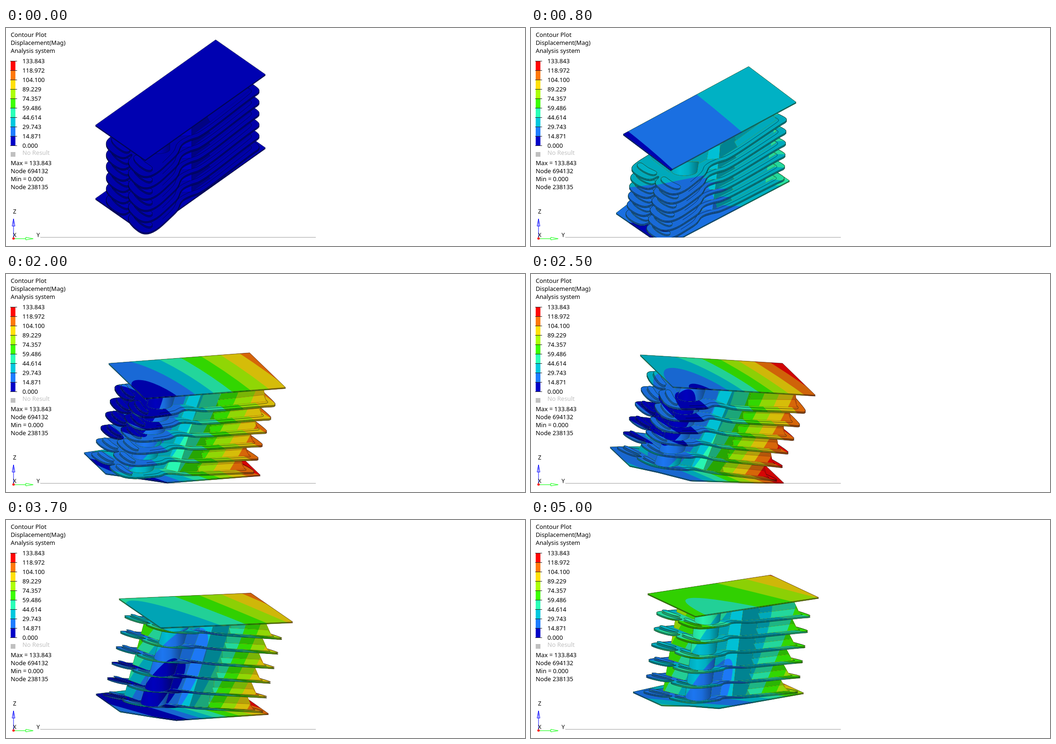
Animation of 1104x464 px, one loop 5100 ms. Source, as an HTML page with a canvas:

```html
<!DOCTYPE html>
<html lang="en">
<head>
<meta charset="utf-8">
<title>Contour Plot</title>
<style>
  html, body { margin: 0; width: 100%; height: 100%; overflow: hidden; background: #fff; }
  svg, canvas { position: absolute; left: 0; top: 0; width: 1104px; height: 464px; }
  text { font: 12.8px "Noto Sans", "Open Sans", sans-serif; fill: #000; }
  .axis { font-size: 12px; }
  .off { fill: #c0c0c0; }
</style>
</head>
<body>
<svg viewBox="0 0 1104 464">
  <path d="M73 445.5H659" stroke="#a0a0a0"/>
</svg>
<canvas id="stage" width="1104" height="464"></canvas>
<svg viewBox="0 0 1104 464">
  <text x="10" y="18.5">Contour Plot</text>
  <text x="10" y="35.5">Displacement(Mag)</text>
  <text x="10" y="52.5">Analysis system</text>
  <g id="legend"></g>
  <rect x="10" y="264" width="10" height="10" fill="#c0c0c0"/>
  <text class="off" x="35" y="269.5">No Result</text>
  <text x="10" y="291.5">Max = 133.843</text>
  <text x="10" y="308.5">Node 694132</text>
  <text x="10" y="325.5">Min = 0.000</text>
  <text x="10" y="342.5">Node 238135</text>
  <g fill="none">
    <path d="M16 447V407M13 421.5L16 406L19 421.5Z" stroke="#00f"/>
    <path d="M17 448.5H42M42 445.5L58 448.5L42 451Z" stroke="#0f0"/>
  </g>
  <circle cx="16" cy="448" r="2.5" fill="#f00"/>
  <text class="axis" x="15" y="395">Z</text>
  <text class="axis" x="15" y="445">X</text>
  <text class="axis" x="65" y="445">Y</text>
</svg>
<script>
const BANDS = ['#0000c8', '#1e7dff', '#00c8de', '#2affb8', '#3cff00', '#acff05', '#ffe00a', '#ff780a', '#ff0505'];
const LOOP = 5100, TICK = 100;
const STEP = 14.871 / 0.69;             // pixels of travel per colour band
const TIMES = [0, 800, 1600, 2500, 3100, 4200, 5000];

// left, front and right corner, then extra travel at the same corners
const LID = [
  [190, 207, 296, 281, 552, 99, 0, 0, 0, 0, 0, 0],
  [196, 226, 297, 302, 564, 158, 0, 0, 0, 0, 0, 0],
  [207, 206, 292, 284, 585, 220, 5, 0, 0, 0, 0, 0],
  [232, 172, 302, 240, 605, 258, 10, -4, 0, 0, 0, 0],
  [232, 171, 313, 237, 606, 240, 10, -4, 0, 0, 0, 0],
  [247, 164, 342, 221, 613, 197, 16, 32, 19, 23, 29, -3],
  [248, 157, 350, 205, 612, 165, 29, 20, 22, 26, 30, 29]
];
// middle-left, right tip and back-left of the top tray, then of the bottom tray
const TRAYS = [
  [257, 281, 538, 135, 211, 243, 257, 401, 538, 255, 211, 363],
  [261, 326, 543, 196, 212, 297, 243, 422, 538, 321, 200, 392],
  [253, 292, 561, 258, 219, 263, 219, 420, 532, 398, 183, 390],
  [272, 246, 582, 293, 247, 208, 223, 388, 522, 438, 182, 367],
  [288, 232, 585, 273, 249, 203, 229, 385, 535, 425, 190, 370],
  [300, 212, 587, 233, 253, 203, 262, 378, 554, 391, 218, 366],
  [310, 213, 593, 204, 265, 196, 290, 376, 567, 365, 237, 364]
];
// bent bottom plate, left to right along its near edge
const BASE = [
  [190, 363, 243, 400, 296, 437, 310, 427, 552, 255],
  [181, 394, 255, 445, 322, 445, 335, 438, 550, 325],
  [167, 390, 220, 438, 300, 445, 345, 445, 545, 404],
  [168, 368, 210, 408, 270, 421, 340, 439, 538, 445],
  [177, 371, 222, 410, 285, 425, 345, 435, 547, 432],
  [203, 369, 260, 403, 325, 409, 378, 416, 568, 395],
  [217, 366, 278, 394, 337, 395, 400, 400, 580, 368]
];
// tray outline: s along the tray, v across it
const FLANGE = [
  [0.96, 2], [1.02, 0.2], [1.005, -0.05], [0.94, 0], [0.48, 0], [0.42, 0.16], [0.34, 0.24],
  [0.28, 0.04], [0.2, 0], [0.06, -0.06], [-0.02, 0.1], [-0.03, 0.55], [-0.01, 0.95],
  [0.05, 1], [0.06, 1.08], [-0.01, 1.1], [-0.03, 1.55], [-0.01, 2], [0.08, 2.05], [0.2, 2]
];
const RIM = [[0.96, 0.6], [0.98, 0.16], [0.93, 0.13], [0.5, 0.13], [0.43, 0.3], [0.33, 0.38], [0.28, 0.2], [0.2, 0.14], [0.1, 0.1]];

const ctx = document.getElementById('stage').getContext('2d');
let trays;

function sample(keys, t) {
  let i = 0;
  while (i < TIMES.length - 2 && t > TIMES[i + 1]) i++;
  const h = TIMES[i + 1] - TIMES[i], x = (t - TIMES[i]) / h;
  const slope = (j, n) => {
    const a = Math.max(j - 1, 0), b = Math.min(j + 1, TIMES.length - 1);
    return (keys[b][n] - keys[a][n]) / (TIMES[b] - TIMES[a]) * h;
  };
  return keys[i].map((p, n) => {
    const q = keys[i + 1][n], m = slope(i, n), k = slope(i + 1, n);
    return p + x * (m + x * (3 * (q - p) - 2 * m - k + x * (2 * (p - q) + m + k)));
  });
}

const pair = (row, i) => [row[2 * i], row[2 * i + 1]];
const sub = (a, b) => [a[0] - b[0], a[1] - b[1]];
const add = (a, b, f = 1) => [a[0] + b[0] * f, a[1] + b[1] * f];

function spot(row, k, s, v) {
  const at = i => add(pair(row, i), sub(pair(row, i + 3), pair(row, i)), k / 5);
  const f = at(0);
  return add(add(f, sub(at(1), f), s), sub(at(2), f), v - 1 + s);
}
const pt = (k, s, v) => spot(trays, k, s, v);
const ref = (k, s, v) => {
  const p = pt(k, s, v);
  return [p, sub(p, spot(TRAYS[0], k, s, v))];
};

function poly(points, closed = true) {
  const path = new Path2D();
  points.forEach(p => path.lineTo(...p));
  if (closed) path.closePath();
  return path;
}

function smooth(points, closed = true) {
  const path = new Path2D(), n = points.length;
  const mid = i => {
    const a = points[i % n], b = points[(i + 1) % n];
    return [(a[0] + b[0]) / 2, (a[1] + b[1]) / 2];
  };
  path.moveTo(...mid(0));
  for (let i = 1; i < (closed ? n + 1 : n - 1); i++) path.quadraticCurveTo(...points[i % n], ...mid(i));
  return path;
}

// Travel is linear over a flat part, so each contour is an ellipse.
function paint(path, refs, shade) {
  const [[p0, d0], [p1, d1], [p2, d2]] = refs;
  const u = sub(d1, d0), w = sub(d2, d0), p = sub(p1, p0), q = sub(p2, p0);
  const det = u[0] * w[1] - u[1] * w[0];
  ctx.save();
  ctx.clip(path);
  if (Math.abs(det) < 0.02) {
    ctx.fillStyle = BANDS[Math.min(8, Math.floor(Math.hypot(...d0) / STEP))];
    ctx.fillRect(0, 0, 1104, 464);
  } else {
    const a = (p[0] * w[1] - q[0] * u[1]) / det, b = (p[1] * w[1] - q[1] * u[1]) / det;
    const c = (q[0] * u[0] - p[0] * w[0]) / det, d = (q[1] * u[0] - p[1] * w[0]) / det;
    ctx.fillStyle = BANDS[8];
    ctx.fillRect(0, 0, 1104, 464);
    ctx.save();
    ctx.transform(a, b, c, d, p0[0] - a * d0[0] - c * d0[1], p0[1] - b * d0[0] - d * d0[1]);
    for (let i = 8; i > 0; i--) {
      ctx.fillStyle = BANDS[i - 1];
      ctx.beginPath();
      ctx.arc(0, 0, i * STEP, 0, 7);
      ctx.fill();
    }
    ctx.restore();
  }
  ctx.fillStyle = typeof shade === 'number' ? `rgba(5,10,10,${1 - shade})` : shade;
  ctx.fillRect(0, 0, 1104, 464);
  ctx.restore();
}

function line(path, alpha = 0.7, width = 1) {
  ctx.strokeStyle = `rgba(0,10,20,${alpha})`;
  ctx.lineWidth = width;
  ctx.stroke(path);
}

function wall(k, low, high, shade, top = 1) {
  const s = (low[0][0] + low[low.length - 1][0]) / 2;
  const path = poly([...low.map(c => pt(k, ...c)), ...high.map(c => pt(k - top, ...c)).reverse()]);
  paint(path, [ref(k, 0, 0.4), ref(k, 1, 0.4), ref(k - 1, s, 0.4)], shade);
  line(path, 0.18);
}

function pillar(k) {
  const a = pt(k, 0.2, 0.62), b = pt(k - 1, 0.2, 0.62), r = 27;
  const path = new Path2D();
  path.ellipse(...a, r, 9, 0, Math.PI, 0, true);
  path.lineTo(b[0] + r, b[1]);
  path.lineTo(b[0] - r, b[1]);
  path.closePath();
  const g = ctx.createLinearGradient(a[0] - r, 0, a[0] + r, 0);
  [0.16, 0.06, 0.14, 0.4].forEach((o, i) => g.addColorStop(i / 3, `rgba(5,10,10,${o})`));
  paint(path, [ref(k, 0, 0.6), ref(k, 1, 0.6), ref(k - 1, 0.2, 0.6)], g);
  line(path, 0.35);
}

function petal(k, v, refs) {
  const strip = up => smooth([[0.03, v], [0.015, v + 0.4], [0.03, v + 0.78], [0.075, v + 0.78], [0.06, v + 0.4], [0.075, v]]
    .map(c => pt(k - up, ...c)));
  const foot = strip(0), cap = strip(0.14);
  paint(foot, refs, 0.6);
  line(foot, 0.5);
  paint(cap, refs, 0.88);
  line(cap, 0.65);
}

function tray(k) {
  const flat = [ref(k, 0, 1), ref(k, 1, 0), ref(k, 0, 2)];
  const pts = FLANGE.map(c => pt(k, ...c));
  const under = smooth(pts.map(p => add(p, [0, 3]))), top = smooth(pts);
  paint(under, flat, 0.62);
  line(under, 0.75);
  paint(top, flat, 0.84);
  line(top, 0.75);
  line(smooth(RIM.map(c => pt(k, ...c)), false), 0.6);
  petal(k, 1.15, flat);
  petal(k, 0.12, flat);

  wall(k, [[0.15, 1.8], [0.13, 0.95], [0.3, 0.6]], [[0.15, 1.8], [0.13, 0.95], [0.3, 0.6]], 0.8);
  wall(k, [[0.26, 0.6], [0.4, 0.5]], [[0.26, 0.6], [0.4, 0.5]], 0.78);
  pillar(k);
  wall(k, [[0.38, 0.5], [0.44, 0.25]], [[0.4, 0.55], [0.46, 0.35]], 0.96);
  wall(k, [[0.44, 0.25], [0.6, 0.22]], [[0.46, 0.35], [0.6, 0.4]], 0.64);
  wall(k, [[0.6, 0.22], [0.965, 0.28]], [[0.6, 0.4], [0.94, 0.7]], 0.7);
  wall(k, [[0.6, 0.22], [0.965, 0.24]], [[0.6, 0.36], [0.95, 0.42]], 0.84, 0.3);
}

function plate(points, refs, shade) {
  const side = poly(points.map(p => add(p, [0, 2]))), top = poly(points);
  paint(side, refs, 0.5);
  line(side, 0.45);
  paint(top, refs, shade);
  line(top, 0.5);
}

function draw(t) {
  const lid = sample(LID, t), base = sample(BASE, t);
  trays = sample(TRAYS, t);
  const shade = 0.88 - 0.07 * Math.min(1, Math.max(0, (t - 1200) / 1300));
  ctx.clearRect(0, 0, 1104, 464);
  ctx.save();
  ctx.beginPath();
  ctx.rect(0, 0, 1104, 446);
  ctx.clip();

  const edge = [0, 1, 2, 3, 4].map(i => pair(base, i));
  const back = sub(edge[0], edge[1]);
  const baseRefs = [0, 2, 4].map(i => [edge[i], sub(edge[i], pair(BASE[0], i))]);
  plate([...edge, add(edge[4], back, 2)], baseRefs, shade);

  for (let k = 5; k >= 0; k--) tray(k);

  const [l, f, r] = [0, 1, 2].map(i => pair(lid, i));
  const lidRefs = [l, f, r].map((p, i) => [p, add(sub(p, pair(LID[0], i)), pair(lid, i + 3))]);
  plate([l, f, r, add(r, sub(l, f))], lidRefs, shade);
  ctx.restore();
}

function legend() {
  let out = '';
  for (let i = 0; i < 10; i++) {
    const y = 70 + 20 * i;
    if (i < 9) out += `<rect x="10" y="${y}" width="10" height="21" fill="${BANDS[8 - i]}"/>`;
    out += `<text x="35" y="${y + 4.5}">${(133.843 * (9 - i) / 9).toFixed(3)}</text>`;
  }
  for (let i = 0; i < 10; i++) out += `<path d="M9 ${70.5 + 20 * i}H23.5" stroke="#222"/>`;
  document.getElementById('legend').innerHTML = out;
}

let start, shown = -1;
function loop(now) {
  start ??= now;
  const t = Math.floor((now - start) % LOOP / TICK) * TICK;
  if (t !== shown) draw(shown = t);
  requestAnimationFrame(loop);
}
legend();
draw(0);
requestAnimationFrame(loop);
</script>
</body>
</html>
```
